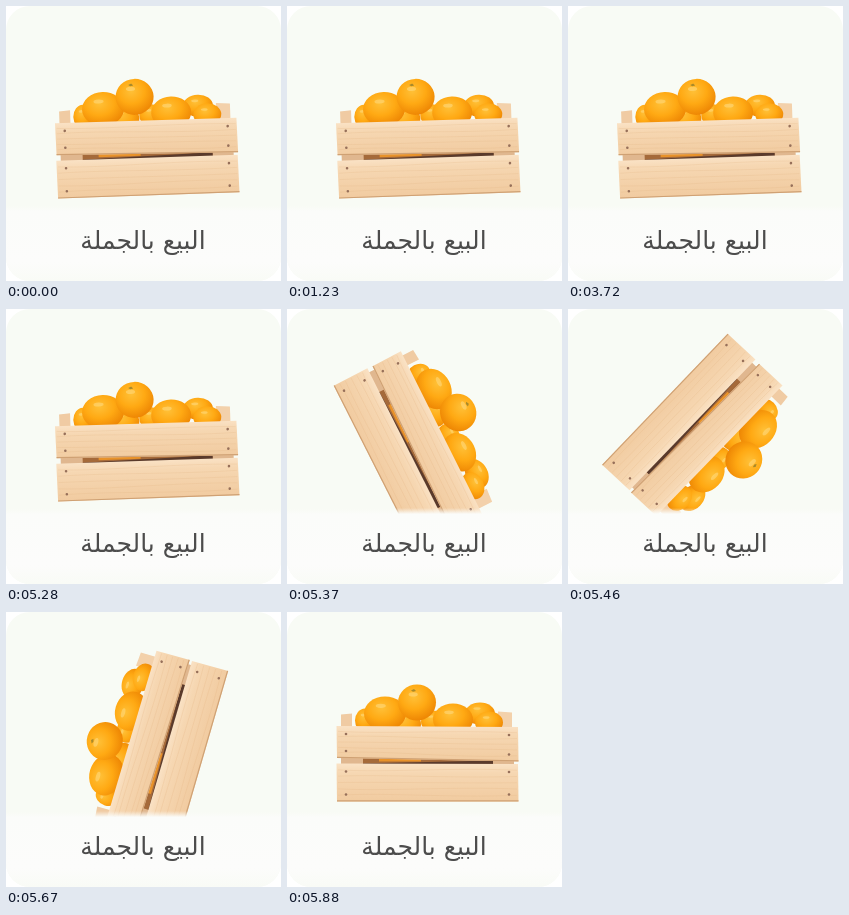
These frames come from a looping animation (275x275 px, 6060 ms). An HTML page:

```html
<!DOCTYPE html>
<html lang="ar">
<head>
<meta charset="utf-8">
<style>
  html, body { margin: 0; width: 100%; height: 100%; overflow: hidden; background: #fff; }
  svg { display: block; width: 100vw; height: 100vh; }
  text { font: 25px "DejaVu Sans", "Noto Sans", sans-serif; fill: #4c4c4c; }
</style>
</head>
<body>
<svg viewBox="0 0 275 275">
  <defs>
    <radialGradient id="peel" cx=".42" cy=".34" r=".7">
      <stop offset="0" stop-color="#ffc037"/>
      <stop offset=".5" stop-color="#ffa913"/>
      <stop offset="1" stop-color="#ec8302"/>
    </radialGradient>
    <linearGradient id="wood" x2="0" y2="1">
      <stop offset="0" stop-color="#fae2c5"/>
      <stop offset=".25" stop-color="#f6d7b2"/>
      <stop offset="1" stop-color="#f1cba0"/>
    </linearGradient>
    <linearGradient id="panel" x2="0" y2="1">
      <stop offset="0" stop-color="#f9fbf7" stop-opacity="0"/>
      <stop offset=".08" stop-color="#fbfcfa"/>
      <stop offset=".75" stop-color="#fcfcfb"/>
      <stop offset="1" stop-color="#f9fbf6"/>
    </linearGradient>
    <clipPath id="card"><rect width="275" height="275" rx="24"/></clipPath>
  </defs>
  <g clip-path="url(#card)">
    <rect width="275" height="275" fill="#f8fbf5"/>
    <g id="crate"></g>
    <rect y="199" width="275" height="76" fill="url(#panel)"/>
    <text x="137" y="242.5" text-anchor="middle" direction="rtl">البيع بالجملة</text>
  </g>
</svg>
<script>
  const LOOP = 6060, STEP = 30, SPIN_AT = 5280, SPIN_FOR = 600;
  const TILT = -2, PIVOT = "140 129";
  const crate = document.getElementById("crate");

  function add(tag, attrs) {
    const el = document.createElementNS("http://www.w3.org/2000/svg", tag);
    for (const key in attrs) el.setAttribute(key, attrs[key]);
    crate.append(el);
  }

  const shape = (d, fill) => add("path", { d, fill });

  function orange(cx, cy, rx, ry) {
    add("ellipse", { cx, cy, rx, ry, fill: "url(#peel)" });
    add("ellipse", { cx: cx - rx * .2, cy: cy - ry * .45, rx: rx * .24, ry: ry * .12, fill: "#ffdf8c", opacity: .5 });
  }

  // Each board has its own top and bottom at the left and right ends.
  function slat(topL, topR, lowL, lowR) {
    shape(`M49.5 ${topL}L231 ${topR}L231.5 ${lowR}L50 ${lowL}Z`, "url(#wood)");
    for (let i = 1; i < 6; i++) {
      const left = topL + i * (lowL - topL) / 6;
      const right = topR + i * (lowR - topR) / 6;
      const bend = Math.sin(i * 2.3 + topL) * 3;
      add("path", {
        d: `M51 ${left}C100 ${left + bend} 165 ${right - bend} 230 ${right}`,
        fill: "none", stroke: "#e3b585", "stroke-width": .7, opacity: .35
      });
    }
    shape(`M50 ${lowL - 1.2}L231.5 ${lowR - 1.2}V${lowR}L50 ${lowL}Z`, "#cfa174");
    for (const [x, top, low] of [[59, topL, lowL], [222, topR, lowR]])
      for (const cy of [top + 8, low - 7])
        add("circle", { cx: x, cy, r: 1.3, fill: "#97705a" });
  }

  // Posts and fruit sit behind the slats.
  shape("M54 101L65 100V114H54Z", "#f0cba3");
  shape("M211 98L225 99V116H211Z", "#f3d1ab");
  [
    [78, 107, 10, 12], [118, 111, 16, 14], [146, 108, 12, 11],
    [193, 100, 15, 11], [202, 109, 14, 11], [166, 106, 20, 16],
    [98, 100, 21, 17], [130, 89, 19, 18]
  ].forEach(o => orange(...o));
  add("path", { d: "M124 77l3 -1.5l2 2l-3 .8z", fill: "#a98a2a" });

  // The opening between the slats: back wall, fruit and shadow.
  shape("M54 143H227V153H54Z", "#e0b78f");
  shape("M76 143H206V153H76Z", "#a56a3a");
  shape("M92 143H134V148H92Z", "#e8922a");
  shape("M76 150L206 147V152H76Z", "#5a3a2b");
  slat(112.5, 113.5, 144.5, 148);
  slat(150, 150.5, 188, 188);

  const ease = u => u * (1.113 + .701 * u - .814 * u * u);

  function draw(now) {
    const t = Math.floor(now % LOOP / STEP) * STEP;
    const u = Math.min(1, Math.max(0, (t - SPIN_AT) / SPIN_FOR));
    const angle = TILT + (360 - TILT) * ease(u);
    crate.setAttribute("transform", `translate(0 1.5) rotate(${angle} ${PIVOT})`);
  }

  let start;
  function tick(now) {
    start ??= now;
    draw(now - start);
    requestAnimationFrame(tick);
  }
  draw(0);
  requestAnimationFrame(tick);
</script>
</body>
</html>
```
